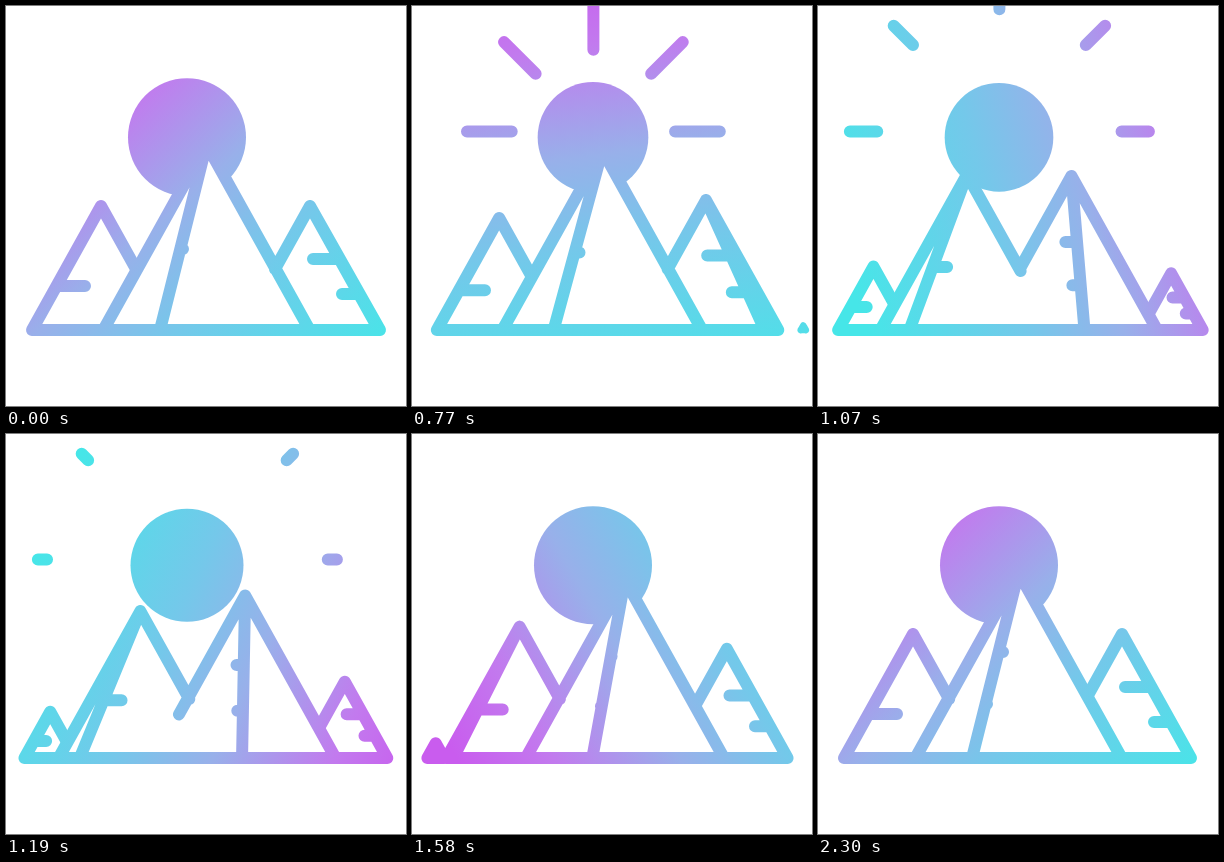
Recreate the animation shown at these times as an HTML page. Size 400 by 400 pixels, loop 2330 ms.

```html
<!DOCTYPE html>
<html>
<head>
<meta charset="utf-8">
<title>Mountains</title>
<style>
html, body { margin: 0; width: 100%; height: 100%; overflow: hidden; background: #fff; }
svg { display: block; width: 100vw; height: 100vh; }
.line { fill: none; stroke: url(#tint); stroke-width: 12; stroke-linecap: round; stroke-linejoin: round; }
.body { fill: #fff; }
</style>
</head>
<body>
<svg viewBox="0 0 400 400">
  <defs>
    <linearGradient id="tint" gradientUnits="userSpaceOnUse">
      <stop offset=".04" stop-color="#c95cee"/>
      <stop offset=".22" stop-color="#c27aee"/>
      <stop offset=".46" stop-color="#98b0ea"/>
      <stop offset=".66" stop-color="#74c8ea"/>
      <stop offset="1" stop-color="#46e6e8"/>
    </linearGradient>
  </defs>
  <path id="rays" class="line"/>
  <circle id="sun" cx="181" cy="131.3" fill="url(#tint)"/>
  <path id="first" class="line"/>
  <path id="last" class="line"/>
  <path id="bodies" class="body"/>
  <path id="middle" class="line"/>
</svg>
<script>
const LOOP = 2330, START = 500, STEP = 30;
const BASE = 324, VALLEY = 263, SLOPE = 0.556;

const $ = id => document.getElementById(id);
const clamp = v => Math.min(1, Math.max(0, v));
const mix = (a, b, k) => a + (b - a) * k;
const mixPt = (a, b, k) => [mix(a[0], b[0], k), mix(a[1], b[1], k)];
const smooth = k => k * k * (3 - 2 * k);
const seg = (x1, y1, x2, y2) =>
  `M${x1.toFixed(2)} ${y1.toFixed(2)}L${x2.toFixed(2)} ${y2.toFixed(2)}`;

// cubic-bezier(.33, 0, .18, 1)
function ease(u) {
  u = clamp(u);
  let lo = 0, hi = 1;
  for (let i = 0; i < 24; i++) {
    const s = (lo + hi) / 2, q = 1 - s;
    if (3 * s * q * q * 0.33 + 3 * s * s * q * 0.18 + s * s * s < u) lo = s;
    else hi = s;
  }
  return smooth(lo);
}

function track(keys, t) {
  for (let i = 1; i < keys.length; i++) {
    const [t0, a] = keys[i - 1], [t1, b] = keys[i];
    if (t <= t1) return mix(a, b, clamp((t - t0) / (t1 - t0)));
  }
  return keys[keys.length - 1][1];
}

// Resting places of a peak and its marks
const LEFT = [95, 200], CENTRE = [200.5, 138.5], RIGHT = [304, 200];
const GONE = [14, BASE], BORN = [394.5, BASE];
const MARK_L = [79, 280], MARK_R1 = [307, 253], MARK_R2 = [336, 288];

// Turn and offset of the gradient
const ANGLE = [[500, 228], [700, 247], [950, 302], [1190, 385], [1580, 510], [1820, 557], [2330, 588]];
const SHIFT = [[500, 0], [950, 57], [1190, 40], [1580, -15], [1820, -15], [2330, 0]];

const half = peak => SLOPE * (BASE - peak[1]);
const footL = peak => peak[0] - half(peak);
const footR = peak => peak[0] + half(peak);

const triangle = peak =>
  `M${footL(peak)} ${BASE}L${peak[0]} ${peak[1]}L${footR(peak)} ${BASE}Z`;

// Peak with slopes that may stop above the ground
function outline(peak, endL, endR) {
  const [x, y] = peak;
  return `M${x - SLOPE * (endL - y)} ${endL}L${x} ${y}L${x + SLOPE * (endR - y)} ${endR}` +
    seg(footL(peak), BASE, footR(peak), BASE);
}

// Horizontal mark from its tip to the line peak - foot
function mark(tip, peak, foot) {
  const k = (tip[1] - peak[1]) / (BASE - peak[1] || 1);
  return seg(tip[0], tip[1], mix(peak[0], foot, k), tip[1]);
}

function setLine(id, d, height) {
  $(id).setAttribute("d", d);
  $(id).style.strokeWidth = 12 * clamp(height / 8);
}

function drawTint(t) {
  const a = track(ANGLE, t) * Math.PI / 180, o = track(SHIFT, t);
  const c = Math.cos(a), s = Math.sin(a), g = $("tint");
  const put = (n, d) => {
    g.setAttribute("x" + n, 200 + c * d);
    g.setAttribute("y" + n, 200 + s * d);
  };
  put(1, o + 230);
  put(2, o - 230);
}

function drawSun(t) {
  const dip = Math.sin(Math.PI * clamp((t - START) / 900)) ** 2;
  $("sun").setAttribute("r", 59 - 5.6 * dip);

  const head = 1 - (1 - clamp((t - START) / 500)) ** 1.4;
  const tail = smooth(clamp((t - 735) / 590));
  let d = "";
  if (head > 0 && tail < 0.999) {
    const r0 = mix(81, 149.5, tail), r1 = mix(81, 149.5, head);
    for (let i = 0; i < 5; i++) {
      const a = Math.PI * (1 + i / 4), c = Math.cos(a), s = Math.sin(a);
      d += seg(181.4 + c * r0, 125.5 + s * r0, 181.4 + c * r1, 125.5 + s * r1);
    }
  }
  $("rays").setAttribute("d", d);
}

function drawRange(t) {
  const p = ease((t - START) / (LOOP - START));
  const grow = p - 0.95 * p * (1 - p) ** 4;

  const a = mixPt(LEFT, GONE, p);
  setLine("first", outline(a, BASE, BASE) +
    mark(mixPt(MARK_L, [17, 323], p), a, footL(a)), BASE - a[1]);

  const d = mixPt(BORN, RIGHT, grow);
  setLine("last", outline(d, BASE, BASE) +
    mark(mixPt(BORN, MARK_R1, grow), d, footR(d)) +
    mark(mixPt(BORN, MARK_R2, grow), d, footR(d)), BASE - d[1]);

  const b = mixPt(CENTRE, LEFT, p), c = mixPt(RIGHT, CENTRE, p);
  const ridgeB = mix(154, 26, p), ridgeC = mix(374, 154, p);
  const endB = mix(BASE, VALLEY + 2, smooth(clamp((p - 0.1) / 0.2)));
  const endC = mix(VALLEY, BASE, clamp((p - 0.55) / 0.27));
  $("bodies").setAttribute("d", triangle(b) + triangle(c));
  $("middle").setAttribute("d",
    outline(b, BASE, endB) + seg(b[0], b[1], ridgeB, BASE) +
    mark(mixPt([177, 243], MARK_L, p), b, ridgeB) +
    outline(c, endC, BASE) + seg(c[0], c[1], ridgeC, BASE) +
    mark(mixPt(MARK_R1, [185, 218], p), c, ridgeC) +
    mark(mixPt(MARK_R2, [169, 270], p), c, ridgeC));
}

function render(ms) {
  let t = ms % LOOP;
  t = t < START + STEP ? START : START + Math.floor((t - START) / STEP) * STEP;
  drawTint(t);
  drawSun(t);
  drawRange(t);
}

const begin = performance.now();
function tick() {
  render(performance.now() - begin);
  requestAnimationFrame(tick);
}
tick();
</script>
</body>
</html>
```
